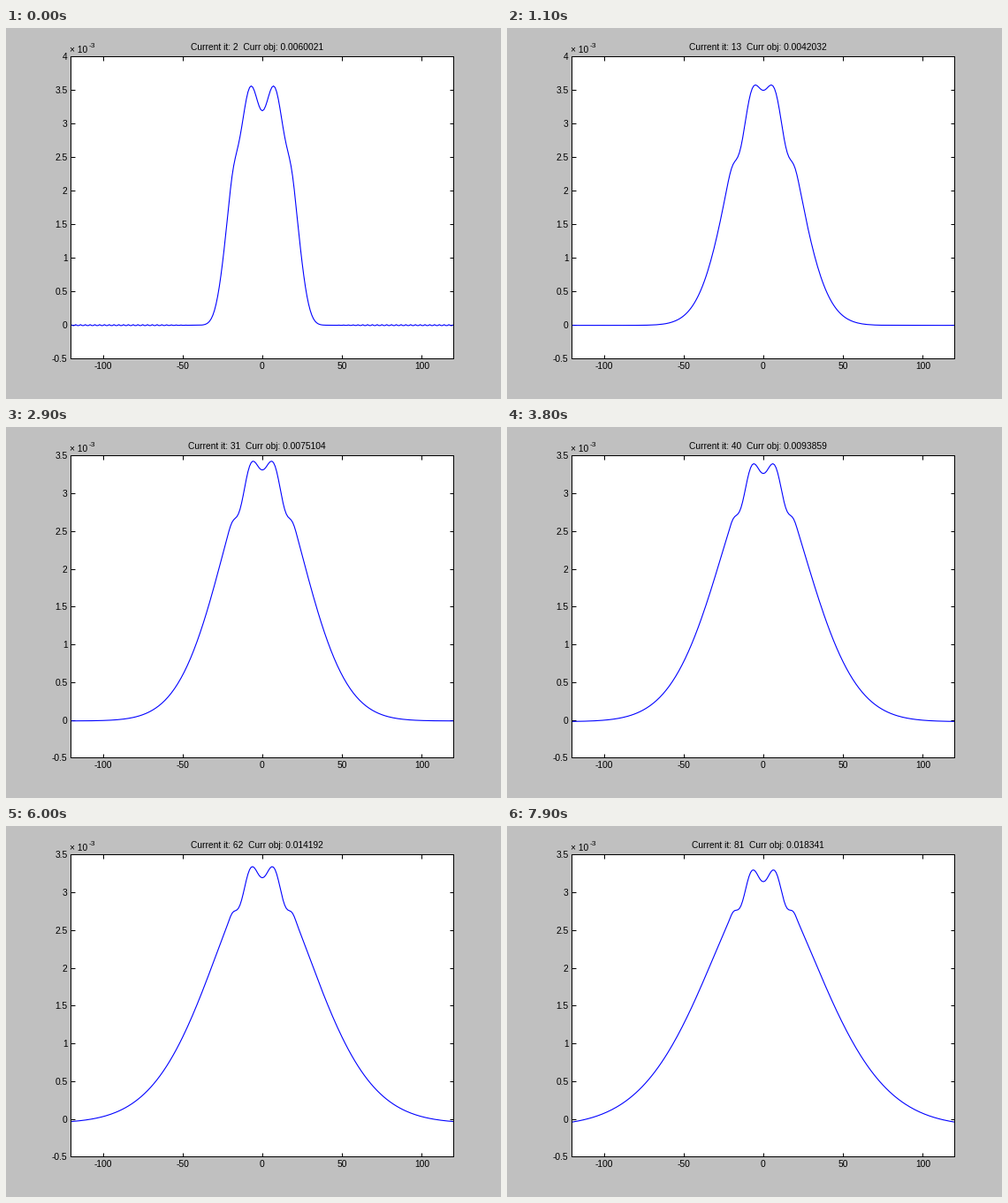
Animation of 560 by 420 pixels, one loop 8000 ms. Source, as a matplotlib script:

```python
import numpy as np
import matplotlib.pyplot as plt
from matplotlib.animation import FuncAnimation

W, H, DPI = 560, 420, 80
PX = 72 / DPI  # points per pixel
LEFT, RIGHT, TOP, BOTTOM = 73.49, 506.49, 32.49, 374.49
FRAMES, INTERVAL = 80, 100
FIRST_IT, RESCALE_IT = 2, 19
X = np.arange(-120, 121)

plt.rcParams.update({"font.family": "Liberation Sans", "font.size": 10.3 * PX})

# Key readings of the objective: (iteration, value)
OBJ_KEYS = [(2, .0060021), (6, .0038526), (13, .0042032), (22, .0057379),
            (31, .0075104), (50, .011548), (62, .014192), (81, .018341)]


def objective(it):
    """Smooth cubic through the key readings."""
    xs, ys = np.array(OBJ_KEYS).T
    slope = np.gradient(ys, xs)
    i = min(np.searchsorted(xs, it, side="right") - 1, len(xs) - 2)
    h = xs[i + 1] - xs[i]
    s = (it - xs[i]) / h
    return ((1 + 2 * s) * (1 - s) ** 2 * ys[i] + s * (1 - s) ** 2 * h * slope[i]
            + s ** 2 * (3 - 2 * s) * ys[i + 1] - s ** 2 * (1 - s) * h * slope[i + 1])


def profile(it):
    """Spreading bell with a rippled crown, in units of 1e-3."""
    early = np.exp(-(it - FIRST_IT) / 3)
    excess = .69 * np.exp(-(it - 13) / 15)
    height = 3.37 + excess - 1.36 * early
    width = 10.6 + 4.69 * np.sqrt(it) + 6.1 * early
    power = 2 - .164 * np.log(it / 13) + 1.7 * early
    sink = .1 * (it / 81) ** 2.2
    dip = .6 * excess - .81 * early
    wave = (.13 + .07 * early) * np.cos(2 * np.pi * X / 14.8)

    r = np.abs(X)
    bell = height * np.exp(-(r / width) ** power) - sink
    crown = np.exp(-(r / 19) ** 8)
    ripple = .009 * early * np.cos(2 * np.pi * X / 3) * np.clip((r - 45) / 20, 0, 1)
    return bell - crown * (dip + wave) + ripple


def label(x, y, text, **kw):
    return fig.text(x / W, 1 - y / H, text, va="baseline", **kw)


fig = plt.figure(figsize=(W / DPI, H / DPI), dpi=DPI, facecolor="#c0c0c0")
ax = fig.add_axes([LEFT / W, 1 - BOTTOM / H, (RIGHT - LEFT) / W, (BOTTOM - TOP) / H])
ax.set_xlim(-120, 120)
ax.set_xticks(range(-100, 101, 50))
ax.tick_params(direction="in", top=True, right=True, length=4.5 * PX,
               width=PX, pad=4 * PX)
for axis in (ax.xaxis, ax.yaxis):
    axis.set_major_formatter(lambda v, pos: f"{v:g}")
for spine in ax.spines.values():
    spine.set_linewidth(PX)

curve, = ax.plot([], [], color="#0000ff", lw=1.1 * PX)
title = label(284, 25, "", ha="center")
label(72, 28, "× 10")
label(94, 22.5, "-3", fontsize=8.5 * PX)


def update(frame):
    it = FIRST_IT + frame
    top = 4 if it < RESCALE_IT else 3.5
    ax.set_yticks(np.arange(-.5, top + .1, .5))
    ax.set_ylim(-.5, top)
    curve.set_data(X, profile(it))
    title.set_text(f"Current it: {it}  Curr obj: {objective(it):.5g}")
    return curve, title


anim = FuncAnimation(fig, update, frames=FRAMES, interval=INTERVAL,
                     repeat=True, repeat_delay=0, blit=False)
plt.show()
```
